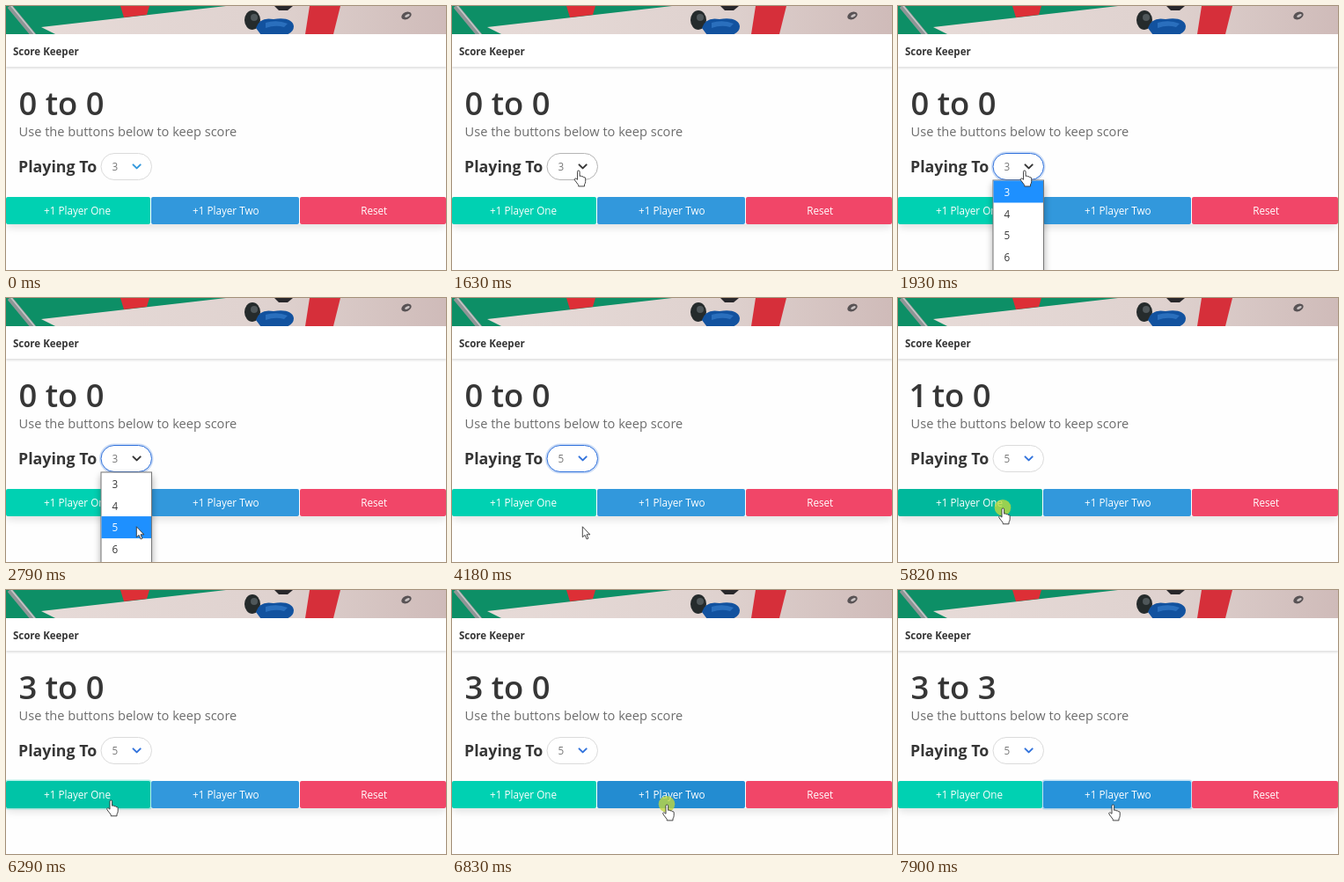
These frames come from a looping animation (500x300 px, 8000 ms). An HTML page:

```html
<!DOCTYPE html>
<html lang="en">
<head>
<meta charset="utf-8">
<title>Score Keeper</title>
<style>
  html, body { margin: 0; width: 100%; height: 100%; overflow: hidden; background: #fefefe; }
  svg { display: block; width: 500px; height: 300px; }
  text { font-family: "Open Sans", "Noto Sans", sans-serif; fill: #363636; }
  .button { font-size: 11.7px; fill: #fff; text-anchor: middle; }
  .small { font-size: 11.7px; }
  .cursor { fill: #fff; stroke: #333; stroke-width: .9; stroke-linejoin: round; }
</style>
</head>
<body>
<svg viewBox="0 0 500 300">
  <defs>
    <filter id="blur" x="-30%" y="-30%" width="160%" height="160%"><feGaussianBlur stdDeviation="4.5"/></filter>
    <filter id="soft" x="-5%" y="-100%" width="110%" height="300%"><feGaussianBlur stdDeviation="1.2"/></filter>
    <clipPath id="photo"><rect width="500" height="32"/></clipPath>
    <linearGradient id="table"><stop stop-color="#e8dcd9"/><stop offset=".6" stop-color="#dfd2cf"/><stop offset="1" stop-color="#cfbbb9"/></linearGradient>
  </defs>

  <g clip-path="url(#photo)">
    <rect width="500" height="32" fill="url(#table)"/>
    <path d="M0 0H250L40 24L56 32H0Z" fill="#0d8f66"/>
    <path d="M130 0H163L160 10L134 13Z" fill="#dd2f36"/>
    <path d="M4 0L32 34" stroke="#8f9596" stroke-width="6"/>
    <path d="M6 0L34 34" stroke="#c5c9c8" stroke-width="1.5"/>
    <ellipse cx="280" cy="16" rx="9" ry="11" fill="#252b2c"/>
    <ellipse cx="282" cy="13" rx="4" ry="4" fill="#4f575a"/>
    <path d="M284 25Q288 12 304 15Q325 12 327 23Q327 30 318 33H290Z" fill="#12529f"/>
    <path d="M295 19Q308 15 320 20L316 24Q306 21 295 25Z" fill="#2a6fbd"/>
    <path d="M305 0H326L320 5H310Z" fill="#28272b"/>
    <path d="M345 0H380L372 32H340Z" fill="#d62f3a"/>
    <ellipse cx="455" cy="11" rx="6" ry="4" transform="rotate(-25 455 11)" fill="#595355"/>
    <ellipse cx="456" cy="11" rx="3" ry="1.5" transform="rotate(-25 456 11)" fill="#c9c2c2"/>
  </g>

  <rect y="67" width="500" height="4" fill="#000" opacity=".11" filter="url(#soft)"/>
  <rect y="32" width="500" height="37" fill="#fff"/>
  <text x="8" y="55.5" font-size="11.5" font-weight="700">Score Keeper</text>

  <text y="124" font-size="36.4" font-weight="600"><tspan id="left"></tspan><tspan id="middle"> to </tspan><tspan id="right"></tspan></text>
  <text x="14.6" y="148.3" font-size="14.6" style="fill:#6c6c6c">Use the buttons below to keep score</text>
  <text x="14" y="188.5" font-size="17.8" font-weight="700">Playing To</text>

  <rect y="223" x="1" width="498" height="29" fill="#000" opacity=".11" filter="url(#blur)"/>
  <rect y="217" width="500" height="31" fill="#fff"/>
  <g id="buttons"></g>

  <rect id="ring" x="107.5" y="167" width="58.5" height="31" rx="15.5" fill="none" stroke="#3273dc" stroke-opacity=".25" stroke-width="3"/>
  <rect id="select" x="108" y="167.5" width="57.5" height="30" rx="15" fill="#fff"/>
  <text id="target" class="small" x="120.6" y="187" style="fill:#777"></text>
  <path id="chevron" d="M144.5 180.4L148.6 184.4L152.7 180.4" fill="none" stroke-width="2" stroke-linecap="round" stroke-linejoin="round"/>

  <g id="menu">
    <rect x="108" y="202" width="58" height="110" fill="#000" opacity=".35" filter="url(#blur)"/>
    <rect x="108" y="198" width="57.5" height="110" fill="#fff" stroke="#777"/>
    <rect id="highlight" x="108.5" width="56.5" height="25" fill="#1e90ff"/>
    <g id="options"></g>
  </g>

  <circle id="click" r="9.3" fill="#c3d83c" opacity=".78"/>
  <path id="arrow" class="cursor" d="M0 0V12L2.8 9.6L4.8 14.2L6.6 13.4L4.7 9H8.5Z"/>
  <path id="hand" class="cursor" d="M-1 11V2a1.3 1.3 0 0 1 2.6 0V7q2.2-.9 2.4.6q2-.6 2.2.8q2-.4 2 1.2V13q0 2-1.2 3.6V18.6H.2V17.2Q-1.4 15-4 11.6Q-4.8 10-3.6 9.6Q-2.4 9.4-1 11Z"/>
</svg>

<script>
const LOOP = 8000;
const $ = id => document.getElementById(id);
const show = (id, on) => $(id).setAttribute('visibility', on ? 'visible' : 'hidden');
const within = (t, a, b) => t >= a && t < b;

function create(parent, tag, attrs, text = '') {
  const node = document.createElementNS('http://www.w3.org/2000/svg', tag);
  for (const key in attrs) node.setAttribute(key, attrs[key]);
  node.textContent = text;
  return parent.appendChild(node);
}

// Colours: normal, hovered, pressed
const buttons = [
  { label: '+1 Player One', x: 0, width: 164, textX: 81, colors: ['#00d1b2', '#00c4a7', '#00b89c'] },
  { label: '+1 Player Two', x: 165, width: 168, textX: 249.8, colors: ['#3298dc', '#2793da', '#238cd1'] },
  { label: 'Reset', x: 334, width: 166, textX: 418.2, colors: ['#f14668'] }
];
for (const b of buttons) {
  const box = { x: b.x, y: 217, width: b.width, height: 31, rx: 2 };
  b.ring = create($('buttons'), 'rect', {
    ...box, fill: 'none', stroke: b.colors[0], 'stroke-opacity': .3, 'stroke-width': 3
  });
  b.face = create($('buttons'), 'rect', box);
  create($('buttons'), 'text', { class: 'button', x: b.textX, y: 236.8 }, b.label);
}

const rowY = i => 198.5 + i * 24.8;
const options = [3, 4, 5, 6].map((n, i) =>
  create($('options'), 'text', { class: 'small', x: 120.5, y: rowY(i) + 17.3 }, n));

// Pointer stops: time, shape, x, y
const pointer = [
  [910, 'arrow', 109.5, 199.5], [1000, 'arrow', 109.5, 198],
  [1230, 'hand', 114, 194], [1380, 'hand', 130, 190], [1460, 'hand', 143, 187], [1630, 'hand', 143.5, 186.3],
  [2560, 'arrow', 146, 226], [2640, 'arrow', 147.5, 252.5], [2790, 'arrow', 148.3, 259.8],
  [4640, 'arrow', 140, 255], [4720, 'arrow', 133.5, 251.5],
  [4870, 'hand', 125, 245], [4950, 'hand', 120, 238.8], [5120, 'hand', 119, 238.2],
  [6520, 'hand', 200, 242], [6600, 'hand', 244, 243.3]
];
const presses = [[1860, 1930], [5350, 5590], [5820, 5890], [6120, 6290], [6750, 6980], [7750, 7900]];
const pointsOne = [5590, 5890, 6290];
const pointsTwo = [6980, 7440, 7900];
const count = (times, t) => times.filter(time => t >= time).length;

function drawScore(t) {
  const one = count(pointsOne, t), two = count(pointsTwo, t);
  $('left').textContent = one;
  $('right').textContent = two;
  // The digit 1 is set narrower than the others
  $('left').setAttribute('x', one === 1 ? 12.5 : 14.5);
  $('middle').setAttribute('dx', one === 1 ? -4 : 0);
  $('right').setAttribute('dx', two === 1 ? -2 : 0);
}

function drawSelect(t) {
  const hovered = within(t, 1230, 4180);
  const focused = within(t, 1860, 5350);
  const open = within(t, 1930, 4180);
  show('ring', focused);
  $('select').setAttribute('stroke', focused ? '#3273dc' : hovered ? '#b5b5b5' : '#dbdbdb');
  $('chevron').setAttribute('stroke', hovered ? '#363636' : t < 1230 ? '#3298dc' : '#3273dc');
  $('target').textContent = t < 4180 ? 3 : 5;
  show('menu', open);
  const active = count([2560, 2640], t);
  $('highlight').setAttribute('y', rowY(active));
  options.forEach((option, i) => option.style.fill = i === active ? '#fff' : '#363636');
}

function drawButtons(t, pressed) {
  const hovered = t < 4870 ? -1 : t < 6520 ? 0 : 1;
  const focused = t < 5350 ? -1 : t < 6750 ? 0 : 1;
  buttons.forEach((b, i) => {
    const state = i !== hovered ? 0 : pressed ? 2 : 1;
    b.face.setAttribute('fill', b.colors[state]);
    b.ring.setAttribute('visibility', i === focused && !pressed ? 'visible' : 'hidden');
  });
}

function drawPointer(t, pressed) {
  const [, shape, x, y] = pointer.filter(stop => t >= stop[0]).pop() || [0, '', 0, 0];
  for (const id of ['arrow', 'hand', 'click']) $(id).setAttribute('transform', `translate(${x} ${y})`);
  show('arrow', shape === 'arrow');
  show('hand', shape === 'hand');
  show('click', pressed);
}

function draw(t) {
  const pressed = presses.some(([down, up]) => within(t, down, up));
  drawScore(t);
  drawSelect(t);
  drawButtons(t, pressed);
  drawPointer(t, pressed);
}

const start = performance.now();
function tick() {
  draw((performance.now() - start) % LOOP);
  requestAnimationFrame(tick);
}
tick();
</script>
</body>
</html>
```
